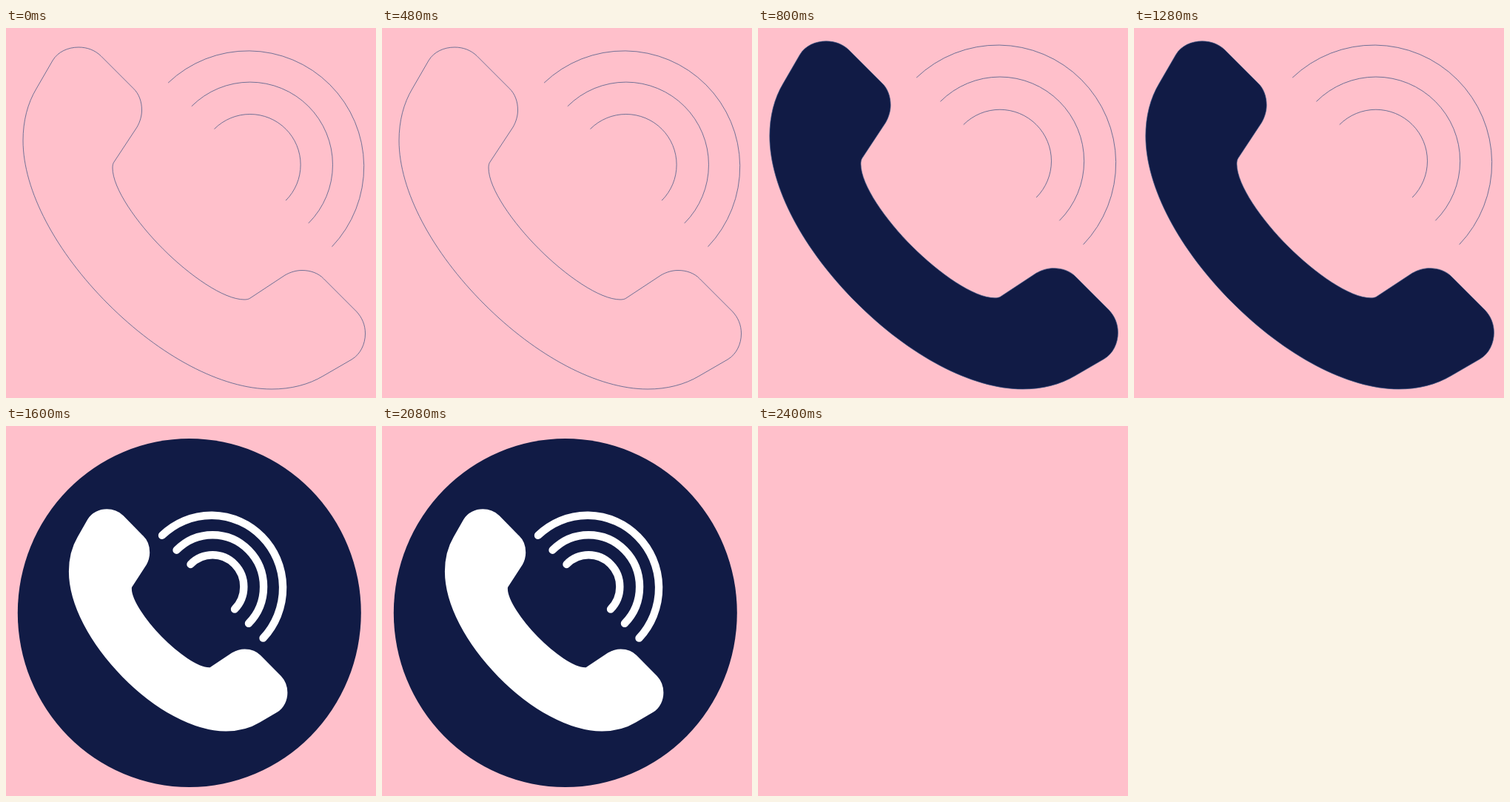
An HTML page that plays this animation: 500 px wide and 500 px high, repeating every 2440 ms.

```html
<!DOCTYPE html>
<html lang="en">
<head>
<meta charset="utf-8">
<title>Ringing phone</title>
<style>
  html, body { margin: 0; width: 100%; height: 100%; overflow: hidden; background: #ffc0cb; }
  svg { display: block; width: 100vw; height: 100vh; }
  .pose { opacity: 0; animation: show 2440ms step-end infinite; }
  .filled { animation-delay: -1640ms; }
  .badge { animation-delay: -840ms; }
  .thin { fill: none; stroke: #35507f; stroke-width: .7; }
  .solid { fill: #111b45; stroke: #35507f; stroke-width: .7; }
  .white { fill: #fff; stroke: #fff; stroke-width: 16.8; stroke-linecap: round; }
  #waves { fill: none; }
  /* visible for 800 of 2440 ms */
  @keyframes show {
    0% { opacity: 1; }
    32.787%, 100% { opacity: 0; }
  }
</style>
</head>
<body>
<svg viewBox="0 0 500 500">
  <defs>
    <path id="phone" d="M138 373C68 303 23 220 23 152C23 126 29 102 41 82L63 44
      C70 32 84 26 98 26C110 26 120 30 128 37.5L172 81.5
      C180 89 183.5 100 183.5 111C183.5 119 181 127 177 134L146 181
      C144.5 183 144 186 144 189C144 217 177 263.4 212.3 298.7
      C247.6 334 294 367 322 367C325 367 328 366.5 330 365L377 334
      C384 330 392 327.5 400 327.5C411 327.5 422 331 429.5 339L473.5 383
      C481 391 485.5 401 485.5 413C485.5 427 479 441 467 448L429 470
      C409 482 385 488 359 488C291 488 208 443 138 373Z"/>
    <g id="waves">
      <path d="M219.1 74.1A156.6 156.6 0 0 1 440.5 295.5"/>
      <path d="M250.8 105.8A111.7 111.7 0 0 1 408.8 263.8"/>
      <path d="M281.5 136.5A68.3 68.3 0 0 1 378.1 233.1"/>
    </g>
  </defs>

  <g class="pose thin">
    <use href="#phone"/>
    <use href="#waves"/>
  </g>

  <g class="pose filled">
    <use href="#phone" class="solid" transform="translate(-7.6 -8.6) scale(1.0175)"/>
    <use href="#waves" class="thin" transform="translate(-9 -8.4) scale(1.0185)"/>
  </g>

  <g class="pose badge">
    <ellipse cx="247.8" cy="252.5" rx="232" ry="235.5" fill="#111b45"/>
    <g class="white" transform="translate(75.9 101.3) scale(.6165 .627)">
      <use href="#phone"/>
      <use href="#waves"/>
    </g>
  </g>
</svg>
</body>
</html>
```
